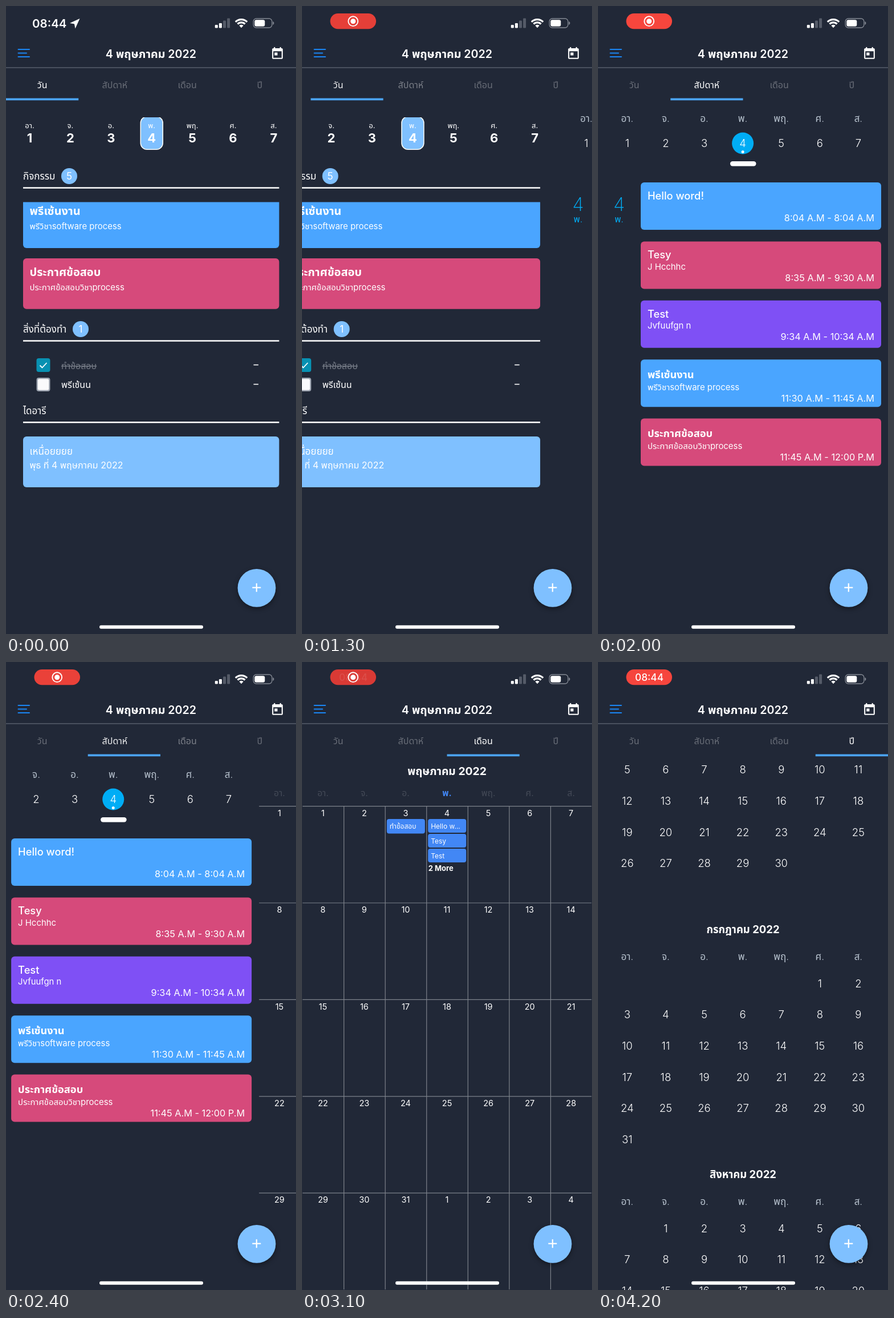
Write an HTML page with a canvas that moves like this. It is 509 by 1100 pixels and loops after 4300 ms.

```html
<!DOCTYPE html>
<html lang="th">
<head>
<meta charset="utf-8">
<style>
  html, body { margin: 0; width: 100%; height: 100%; overflow: hidden; background: #212837; }
  canvas { display: block; }
</style>
</head>
<body>
<canvas id="stage" width="509" height="1100"></canvas>
<script>
const ctx = document.getElementById('stage').getContext('2d');
const W = 509, H = 1100, LOOP = 4300;
const BG = '#212837', BLUE = '#4aa5ff', SKY = '#7fc0ff', PINK = '#d64a7b', PURPLE = '#7f50f5',
      CYAN = '#00adf5', EVENT = '#4287f5', MUTED = '#b6c1cd';
const DAYS = ['อา.', 'จ.', 'อ.', 'พ.', 'พฤ.', 'ศ.', 'ส.'];
const TABS = ['วัน', 'สัปดาห์', 'เดือน', 'ปี'];
const MONTHS = ['พฤษภาคม', 'มิถุนายน', 'กรกฎาคม', 'สิงหาคม'];
const TODAY_ICON = new Path2D('M19 3h-1V1h-2v2H8V1H6v2H5c-1.1 0-2 .9-2 2v14c0 1.1.9 2 2 2h14c1.1 0 2-.9 2-2V5c0-1.1-.9-2-2-2zm0 16H5V8h14v11zM7 10h5v5H7v-5z');

const clamp = v => Math.max(0, Math.min(1, v));
const progress = (t, start, length) => clamp((t - start) / length);
const slide = (t, start) => (1 - Math.cos(Math.PI * progress(t, start, 350))) / 2;

function text(str, x, y, size, { weight = 400, color = '#fff', align = 'left' } = {}) {
  ctx.font = `${weight} ${size}px Inter, "Noto Sans Thai Looped", "Noto Sans", "Noto Sans Thai", sans-serif`;
  ctx.fillStyle = color;
  ctx.textAlign = align;
  ctx.fillText(str, x, y);
  return ctx.measureText(str).width;
}
const centered = (str, x, y, size, weight, color) => text(str, x, y, size, { weight, color, align: 'center' });

function rect(x, y, w, h, color, radius = 0) {
  ctx.beginPath();
  ctx.roundRect(x, y, w, h, radius);
  ctx.fillStyle = color;
  ctx.fill();
}

function circle(x, y, r, color) {
  ctx.beginPath();
  ctx.arc(x, y, r, 0, 2 * Math.PI);
  ctx.fillStyle = color;
  ctx.fill();
}

function stroke(points, color, width) {
  ctx.beginPath();
  points.forEach(([x, y]) => ctx.lineTo(x, y));
  ctx.strokeStyle = color;
  ctx.lineWidth = width;
  ctx.stroke();
}

// Run a drawing with its own clip, offset and alpha
function layer({ clip, x = 0, y = 0, alpha = 1 }, draw) {
  ctx.save();
  if (clip) {
    ctx.beginPath();
    ctx.rect(...clip);
    ctx.clip();
  }
  ctx.translate(x, y);
  ctx.globalAlpha *= alpha;
  draw();
  ctx.restore();
}

function section(label, y, badge, badgeX) {
  text(label, 30, y, 17);
  rect(30, y + 13.2, 449.4, 2.6, '#fff');
  if (badge) {
    circle(badgeX, y - 6, 14, SKY);
    centered(badge, badgeX, y, 17);
  }
}

function dayPage() {
  layer({ clip: [0, 195, W, 60] }, () => {
    rect(235.5, 193, 40.5, 59, '#fff', 12);
    rect(237, 194.5, 37.5, 56, SKY, 10.5);
  });
  DAYS.forEach((name, i) => {
    const x = 41.5 + 71.4 * i;
    centered(name, x, 214, 13);
    centered(i + 1, x, 239, 22, 700);
  });

  section('กิจกรรม', 304, '5', 111);
  rect(30, 343.5, 449.4, 80.5, BLUE, [0, 0, 6, 6]);
  text('พรีเซ้นงาน', 41.5, 366, 20, { weight: 700 });
  text('พรีวิชาsoftware process', 41.5, 391, 14.9);
  rect(30, 442, 449.4, 88.7, PINK, 6);
  text('ประกาศข้อสอบ', 41.5, 472.8, 20, { weight: 700 });
  text('ประกาศข้อสอบวิชาprocess', 41.5, 497.5, 14.9);

  section('สิ่งที่ต้องทำ', 572, '1', 131);
  rect(53.5, 617, 24, 24, '#0891b2', 4);
  stroke([[59.5, 629.5], [63.5, 633.5], [71.5, 625]], '#fff', 1.8);
  const width = text('ทำข้อสอบ', 97, 636, 16, { color: '#747a85' });
  rect(97, 630, width, 1.4, '#747a85');
  rect(53.5, 651, 24, 24, '#9ca3af', 4);
  rect(55.7, 653.2, 19.6, 19.6, '#fafafc', 2.5);
  text('พรีเซ้นน', 97, 669, 16, { weight: 500 });
  for (const y of [627.8, 661.8]) rect(434.5, y, 8.5, 1.6, '#fff');

  section('ไดอารี', 714.8);
  rect(30, 754, 449.4, 89, SKY, 6);
  text('เหนื่อยยยย', 41.5, 786, 17);
  text('พุธ ที่ 4 พฤษภาคม 2022', 41.5, 810, 16);
}

const dayX = i => 51.3 + 67.6 * i;

function weekPage() {
  circle(dayX(3), 240.5, 19, CYAN);
  circle(dayX(3), 255.5, 2.5, '#fff');
  DAYS.forEach((name, i) => {
    centered(name, dayX(i), 203, 17, 300, MUTED);
    centered(i + 1, dayX(i), 247, 18.5, 300);
  });
  rect(232, 272, 45.5, 8.5, '#fff', 4.2);
  centered('4', 37, 359, 33, 200, CYAN);
  centered('พ.', 37, 379, 16, 300, CYAN);

  // title, detail, time, colour, time baseline
  [
    ['Hello word!', '', '8:04 A.M - 8:04 A.M', BLUE, 67.5],
    ['Tesy', 'J Hcchhc', '8:35 A.M - 9:30 A.M', PINK, 69.5],
    ['Test', 'Jvfuufgn n', '9:34 A.M - 10:34 A.M', PURPLE, 69.5],
    ['พรีเซ้นงาน', 'พรีวิชาsoftware process', '11:30 A.M - 11:45 A.M', BLUE, 73.5],
    ['ประกาศข้อสอบ', 'ประกาศข้อสอบวิชาprocess', '11:45 A.M - 12:00 P.M', PINK, 73.5],
  ].forEach(([title, detail, time, color, timeY], i) => {
    const y = 309 + 103.4 * i, thai = i > 2;
    rect(75, y, 422, 83, color, 6);
    text(title, 87, y + (thai ? 32.5 : 30), 18.3, { weight: thai ? 700 : 500 });
    text(detail, 87, y + (thai ? 53.5 : 49.5), 14.9);
    text(time, 485, y + timeY, 16.3, { align: 'right' });
  });
}

function monthPage() {
  const col = 72.57, row = 169.4, top = 252.5, line = '#7d828b';
  centered('พฤษภาคม 2022', 254.5, 198, 19.3, 700);
  for (let i = 1; i < 7; i++) rect(0.4 + col * i, top, 1.2, 846.5, line);
  for (let j = 0; j < 5; j++) rect(1, top - 0.5 + row * j, W - 2, 1.2, line);
  DAYS.forEach((name, i) => {
    const x = 36.8 + col * i, today = i === 3;
    centered(name, x, 235, 15.5, today ? 700 : 400, today ? EVENT : '#444a57');
    for (let j = 0; j < 5; j++) centered((j * 7 + i) % 31 + 1, x, top + 17.3 + row * j, 14.5);
  });
  const event = (label, x, y, h = 24) => {
    rect(x, y, 67, h, EVENT, 4);
    text(label, x + 5, y + 16.7, 12);
  };
  event('ทำข้อสอบ', 148.8, 275, 25.5);
  ['Hello w...', 'Tesy', 'Test'].forEach((label, i) => event(label, 221.2, 275 + 26 * i));
  text('2 More', 221.7, 366, 13, { weight: 700 });
}

function yearPage(t) {
  const p = progress(t, 3760, 440);
  const scroll = 590 * (1 - (1 - p) ** 2);
  MONTHS.forEach((name, i) => {
    const y = 200 + 429 * i - scroll, month = 4 + i;
    const first = new Date(2022, month, 1).getDay();
    const count = new Date(2022, month + 1, 0).getDate();
    centered(`${name} 2022`, 254.5, y + 7, 18.5, 700);
    DAYS.forEach((day, d) => centered(day, dayX(d), y + 54, 17, 300, MUTED));
    for (let d = 1; d <= count; d++) {
      const cell = first + d - 1;
      const color = month === 4 && d === 4 ? CYAN : '#fff';
      centered(d, dayX(cell % 7), y + 101.8 + 54.67 * Math.floor(cell / 7), 18.5, 300, color);
    }
  });
}

function clock(t) {
  const shown = progress(t, 250, 250);
  layer({ alpha: 1 - shown }, () => {
    text('08:44', 46, 38, 20.5, { weight: 600 });
    ctx.beginPath();
    [[129.5, 22], [112, 30], [120, 31.5], [121.5, 39.5]].forEach(p => ctx.lineTo(...p));
    ctx.fill();
  });

  const glow = (1 + Math.cos(2 * Math.PI * (t - 1900) / 2150)) / 2;
  const mix = (a, b) => Math.round(a + (b - a) * glow);
  const timeIn = progress(t, 3070, 300);
  layer({ alpha: shown }, () => {
    rect(49.5, 13, 80.5, 27.3, `rgb(${mix(216, 248)}, ${mix(58, 70)}, ${mix(53, 61)})`, 13.6);
    layer({ alpha: timeIn }, () => centered('08:44', 90, 33, 17.3, 500));
    layer({ alpha: 1 - progress(t, 3120, 250) }, () => {
      circle(89.7, 26.7, 4.5, '#fff');
      ctx.beginPath();
      ctx.arc(89.7, 26.7, 8.4, 0, 2 * Math.PI);
      ctx.strokeStyle = '#fff';
      ctx.lineWidth = 1.9;
      ctx.stroke();
    });
  });
}

function statusIcons() {
  [5.5, 8.5, 13, 17].forEach((h, i) => rect(366.8 + 7.1 * i, 38.5 - h, 5, h, i < 2 ? '#fff' : '#555b68', 1.3));
  const from = -0.75 * Math.PI, to = -0.25 * Math.PI;
  ctx.strokeStyle = ctx.fillStyle = '#fff';
  ctx.lineWidth = 3.2;
  for (const r of [14.4, 9.2]) {
    ctx.beginPath();
    ctx.arc(413, 38, r, from, to);
    ctx.stroke();
  }
  ctx.beginPath();
  ctx.moveTo(413, 38.3);
  ctx.arc(413, 38, 5.2, from, to);
  ctx.fill();
  ctx.beginPath();
  ctx.roundRect(434.2, 22, 32.6, 16, 5);
  ctx.strokeStyle = '#858a94';
  ctx.lineWidth = 1.3;
  ctx.stroke();
  rect(468.3, 27.3, 2, 5.5, '#858a94', [0, 2, 2, 0]);
  rect(436.3, 24.2, 18, 11.6, '#fff', 3);
}

function header(position) {
  [[76, 42], [82.5, 37], [89, 42]].forEach(([y, x]) => rect(20.5, y - 1.1, x - 20.5, 2.2, '#1a86f5', 1));
  centered('4 พฤษภาคม 2022', 254.5, 90.5, 19.7, 600);
  layer({ x: 464, y: 71 }, () => {
    ctx.scale(1.04, 1.04);
    ctx.fillStyle = '#fff';
    ctx.fill(TODAY_ICON);
  });
  rect(0, 107.6, W, 1, '#737986');
  const tab = W / 4;
  TABS.forEach((name, i) => {
    const active = clamp(1 - Math.abs(position - i));
    layer({ alpha: 0.32 + 0.68 * active }, () => centered(name, tab * (i + 0.5), 143.5, 16));
  });
  rect(tab * position, 161.6, tab, 3.6, '#4ba4f2');
}

function overlay() {
  ctx.save();
  ctx.shadowColor = 'rgba(0, 0, 0, .4)';
  ctx.shadowBlur = 8;
  ctx.shadowOffsetY = 3;
  circle(440, 1019.3, 33.4, SKY);
  ctx.restore();
  stroke([[432.3, 1018.7], [447.3, 1018.7]], '#fff', 2.2);
  stroke([[439.8, 1011.2], [439.8, 1026.2]], '#fff', 2.2);
  rect(164, 1084.7, 182, 6, '#fff', 3);
}

function draw(t) {
  rect(0, 0, W, H, BG);
  const position = slide(t, 1222) + slide(t, 2319) + slide(t, 3400);
  [dayPage, weekPage, monthPage, yearPage].forEach((page, i) => {
    const x = (i - position) * W;
    if (Math.abs(x) < W) layer({ clip: [0, 165, W, H - 165], x }, () => page(t));
  });
  clock(t);
  statusIcons();
  header(position);
  overlay();
}

const start = performance.now();
function tick() {
  draw((performance.now() - start) % LOOP);
  requestAnimationFrame(tick);
}
tick();
</script>
</body>
</html>
```
